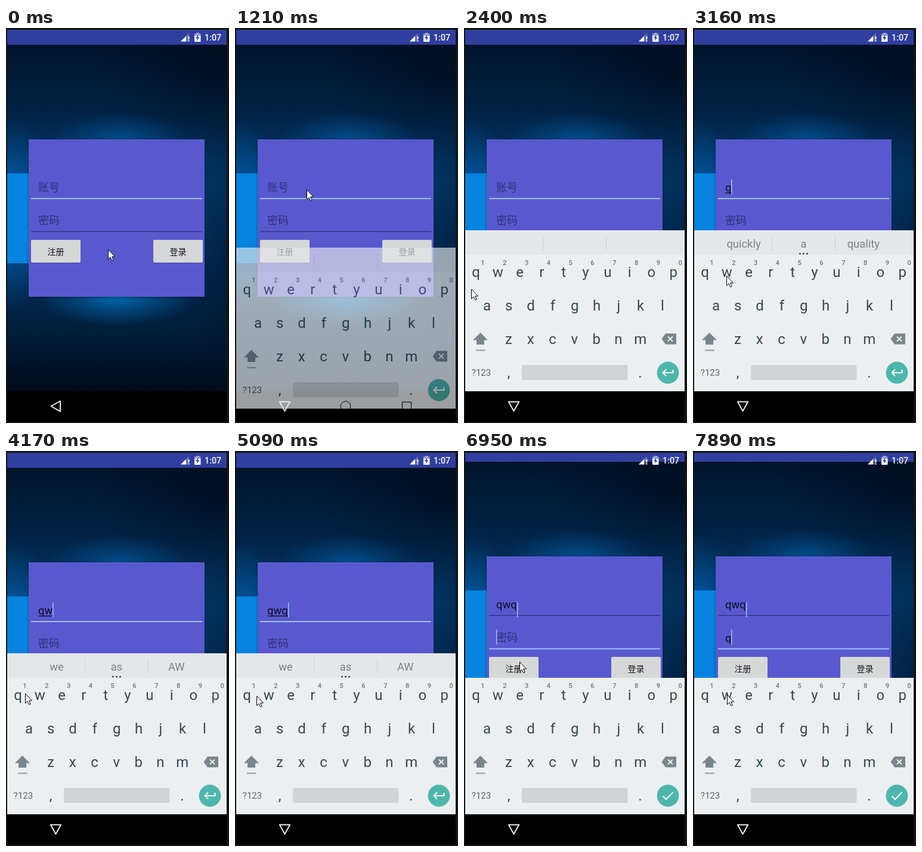
An HTML page with a canvas that plays this animation: 374 px wide and 660 px high, repeating every 8000 ms.

```html
<!DOCTYPE html>
<html lang="zh">
<head>
<meta charset="utf-8">
<style>
html, body { margin: 0; width: 100%; height: 100%; overflow: hidden; background: #141414; }
canvas { display: block; width: 374px; height: 660px; }
</style>
</head>
<body>
<canvas id="stage"></canvas>
<script>
const W = 374, H = 660, LOOP = 8000;
const LEFT = 2, SCREEN = 368, NAV_TOP = 607, KEYS_TOP = 379;
const dpr = window.devicePixelRatio || 1;

const LATIN = 'Roboto, sans-serif';
const CJK = '"Noto Sans CJK SC", "Noto Sans CJK", sans-serif';
const ACCENT = '#9cc0f6', HINT = '#303077', INK = '#0c0c20';
const KEY = '#37474f', KEY_ICON = '#78868c', KEY_BACK = '#eceff1';

const KEY_PRESSES = [2550, 3700, 4940];
const SUGGESTIONS = ['', 'quickly a quality', 'we as AW', 'sqq www away'];
const SUGGESTION_DELAY = 230;
const FIRST_FOCUS = 980, KEYBOARD_OPEN = 1130, SECOND_FOCUS = 6640, PASSWORD_KEY = 7700;

// Pointer waypoints: [ms, x, y]
const POINTER = [
  [200, 171, 370], [900, 108, 252], [1210, 120, 270], [1610, 133, 290], [2400, 12, 436],
  [2930, 56, 414], [3620, 56, 414], [4790, 6, 394], [5090, 35, 409], [5720, 360, 614],
  [6260, 187, 349], [6600, 140, 313], [7590, 8, 422], [7890, 57, 407]
];

function setUp(canvas) {
  canvas.width = W * dpr;
  canvas.height = H * dpr;
  const context = canvas.getContext('2d');
  context.scale(dpr, dpr);
  return context;
}

const stage = setUp(document.getElementById('stage'));
const layer = setUp(document.createElement('canvas'));
let ctx = stage;

const progress = (t, start, duration) => Math.min(1, Math.max(0, (t - start) / duration));
const pressed = t => KEY_PRESSES.filter(time => time <= t).length;

function rect(x, y, w, h, color, radius = 0) {
  ctx.fillStyle = color;
  ctx.beginPath();
  ctx.roundRect(x, y, w, h, radius);
  ctx.fill();
}

function text(str, x, y, size, color, { align = 'left', family = LATIN, weight = 400 } = {}) {
  ctx.font = `${weight} ${size}px ${family}`;
  ctx.textAlign = align;
  ctx.fillStyle = color;
  ctx.fillText(str, x, y);
}

function path(points, closed) {
  ctx.beginPath();
  points.forEach(([x, y]) => ctx.lineTo(x, y));
  if (closed) ctx.closePath();
}

function polygon(points, color) {
  path(points, true);
  ctx.fillStyle = color;
  ctx.fill();
}

function line(points, color, width, closed = false) {
  path(points, closed);
  ctx.strokeStyle = color;
  ctx.lineWidth = width;
  ctx.stroke();
}

function circle(x, y, r, color) {
  ctx.beginPath();
  ctx.arc(x, y, r, 0, Math.PI * 2);
  ctx.fillStyle = color;
  ctx.fill();
}

function glow(x, y, rx, ry, rgb, alpha) {
  ctx.save();
  ctx.translate(x, y);
  ctx.scale(rx, ry);
  const g = ctx.createRadialGradient(0, 0, 0, 0, 0, 1);
  g.addColorStop(0, `rgba(${rgb},${alpha})`);
  g.addColorStop(.5, `rgba(${rgb},${alpha * .45})`);
  g.addColorStop(1, `rgba(${rgb},0)`);
  ctx.fillStyle = g;
  ctx.fillRect(-1, -1, 2, 2);
  ctx.restore();
}

function wallpaper() {
  const g = ctx.createLinearGradient(0, 28, 0, 608);
  ['#00142b', '#012346', '#023a6c', '#023361', '#01203f', '#000b1a']
    .forEach((color, i, all) => g.addColorStop(i / (all.length - 1), color));
  rect(LEFT, 28, SCREEN, 580, g);
  glow(375, 70, 230, 150, '0,8,22', .6);
  glow(385, 400, 110, 260, '0,16,40', .6);
  glow(190, 186, 120, 45, '0,110,195', .5);
  glow(185, 450, 130, 48, '0,125,210', .75);
  glow(0, 310, 100, 160, '0,120,220', .75);
  rect(LEFT, 243, 150, 150, '#0784e0');
}

function button(x, label) {
  rect(x, 355, 83, 38, 'rgba(0,0,0,.25)', 2);
  rect(x, 354, 83, 38, '#d6d7d7', 2);
  text(label, x + 41.5, 379, 14, '#15151c', { align: 'center', family: CJK });
}

function field(value, hint, baseline, active, caret) {
  if (value) text(value, 54, baseline, 18.4, INK);
  else text(hint, 54, baseline - .5, 18, HINT, { family: CJK });
  rect(42, baseline + 11, 287, active ? 2 : 1.3, active ? ACCENT : HINT);
  if (!caret) return;
  ctx.font = `18.4px ${LATIN}`;
  rect(54 + Math.round(ctx.measureText(value).width), baseline - 20, 1.5, 25, ACCENT);
}

function loginCard(t) {
  const user = 'qwq'.slice(0, pressed(t));
  const second = t >= SECOND_FOCUS;
  ctx.save();
  ctx.shadowColor = 'rgba(0,0,0,.4)';
  ctx.shadowBlur = 4 * dpr;
  ctx.shadowOffsetY = dpr;
  rect(38, 186, 295, 263, '#5959cf');
  ctx.restore();

  const blinkOn = user || (t >= FIRST_FOCUS && t % 1000 > 450);
  field(user, '账号', 273, !second, !second && blinkOn);
  if (user && !second) {
    ctx.font = `18.4px ${LATIN}`;
    rect(54, 275, ctx.measureText(user).width, 1.3, INK);
  }
  field(t >= PASSWORD_KEY ? 'q' : '', '密码', 328.5, second, second);
  button(42, '注册');
  button(247, '登录');
}

function suggestions(t) {
  rect(LEFT, 338, SCREEN, 41, '#e4e7e9');
  [132, 238].forEach(x => rect(x, 348, 1, 24, '#cbd0d2'));
  const words = SUGGESTIONS[pressed(t - SUGGESTION_DELAY)];
  if (!words) return;
  words.split(' ').forEach((word, i) =>
    text(word, 85 + i * 100.4, 367, 18.4, '#788287', { align: 'center' }));
  [-6, 0, 6].forEach(dx => circle(185.5 + dx, 377, 1.5, KEY));
}

function shiftIcon(x, y) {
  polygon([[x, y], [x + 12.5, y + 12.5], [x - 12.5, y + 12.5]], KEY_ICON);
  rect(x - 6.5, y + 12, 13, 8, KEY_ICON);
  rect(x - 7.5, y + 28.5, 15.5, 2, '#929da2');
}

function deleteIcon(x, y) {
  polygon([[x - 14.5, y], [x - 8, y - 9], [x + 10, y - 9], [x + 10, y + 9], [x - 8, y + 9]], KEY_ICON);
  [-4, 4].forEach(d => line([[x - 4, y - d], [x + 4, y + d]], KEY_BACK, 2));
}

function enterIcon(x, y, done) {
  circle(x, y, 18.4, '#4db6ac');
  if (done) return line([[x - 8.5, y + .5], [x - 3, y + 6], [x + 8.5, y - 6]], '#fff', 2);
  line([[x + 8.5, y - 5], [x + 8.5, y], [x - 8, y]], '#fff', 2);
  line([[x - 3, y - 5.5], [x - 8.5, y], [x - 3, y + 5.5]], '#fff', 2);
}

function keys(t) {
  const center = { align: 'center' };
  const passwordMode = t >= SECOND_FOCUS + 80;
  if (!passwordMode) suggestions(t);
  rect(LEFT, KEYS_TOP, SCREEN, NAV_TOP - KEYS_TOP, KEY_BACK);
  [['qwertyuiop', 20], ['asdfghjkl', 38.5], ['zxcvbnm', 75]].forEach(([row, x], r) =>
    [...row].forEach((ch, i) => text(ch, x + i * 36.8, 416 + r * 56, 24, KEY, center)));
  [...'1234567890'].forEach((ch, i) =>
    text(ch, 31.5 + i * 36.8, 396, 11, '#69757b', { align: 'center', weight: 500 }));
  text('?123', 29, 581, 15, '#56646b', center);
  text(',', 75, 584, 24, KEY, center);
  text('.', 295.5, 584, 24, KEY, center);
  rect(97, 563, 177.5, 25, '#d0d4d6', 3);
  shiftIcon(27.5, 509);
  deleteIcon(346, 519.5);
  enterIcon(342, 576, passwordMode);
}

// Drawn on its own layer so the whole panel fades as one
function keyboard(t) {
  if (t < KEYBOARD_OPEN) return;
  const rest = (1 - progress(t, KEYBOARD_OPEN, 240)) ** 2;
  ctx = layer;
  ctx.clearRect(0, 0, W, H);
  keys(t);
  ctx = stage;
  ctx.globalAlpha = 1 - .77 * rest;
  ctx.drawImage(layer.canvas, 0, Math.round(65 * rest), W, H);
  ctx.globalAlpha = 1;
}

function statusIcons() {
  polygon([[293, 22.5], [307, 22.5], [307, 8.5]], 'rgba(255,255,255,.25)');
  polygon([[293, 22.5], [302, 22.5], [302, 13.5]], '#fff');
  rect(305.5, 14, 2, 5, '#fff');
  rect(305.5, 20.5, 2, 2, '#fff');
  rect(319, 8, 5, 2, '#9ba3d2');
  rect(316, 9.5, 10.5, 5, '#9ba3d2');
  rect(316, 13, 10.5, 10, '#fff', 1);
  polygon([[322.5, 11], [318, 17], [320.8, 17], [320, 21.5], [324.5, 15.5], [321.8, 15.5]], '#303f9f');
  text('1:07', 333, 21, 14.3, '#fff', { weight: 500 });
}

function navIcons(t) {
  const color = '#e8eaeb';
  ctx.save();
  ctx.lineJoin = 'round';
  ctx.translate(83.5, 632);
  if (t >= FIRST_FOCUS) ctx.rotate(-Math.PI / 2);
  line([[-8, 0], [7.5, -8.7], [7.5, 8.7]], color, 2, true);
  ctx.restore();
  ctx.beginPath();
  ctx.arc(185.5, 632, 8.3, 0, Math.PI * 2);
  ctx.stroke();
  ctx.strokeRect(280.5, 625, 15, 14.5);
}

function pointer(t) {
  const next = POINTER.findIndex(p => p[0] > t);
  const b = POINTER.at(next), a = next > 0 ? POINTER[next - 1] : b;
  const f = a === b ? 0 : progress(t, a[0], b[0] - a[0]);
  const mix = n => Math.round(a[n] + (b[n] - a[n]) * f) + .5;
  ctx.save();
  ctx.translate(mix(1), mix(2));
  const arrow = [[0, 0], [0, 16], [3.6, 12.6], [6.2, 18.2], [8.6, 17.2], [6.2, 11.5], [11, 11.5]];
  polygon(arrow, '#fff');
  line(arrow, '#000', 1, true);
  ctx.restore();
}

function draw(t) {
  rect(0, 0, W, H, '#141414');
  ctx.save();
  ctx.beginPath();
  ctx.rect(LEFT, 3, SCREEN, 655);
  ctx.clip();

  const pan = Math.round(10 * progress(t, SECOND_FOCUS, 240));
  ctx.save();
  ctx.translate(0, -pan);
  wallpaper();
  loginCard(t);
  ctx.restore();
  if (pan) rect(89, 253, 1.5, 25, ACCENT);
  rect(LEFT, 3, SCREEN, 25 - pan, '#303f9f');
  statusIcons();
  rect(LEFT, NAV_TOP, SCREEN, 51, '#000');
  keyboard(t);
  navIcons(t);
  ctx.restore();
  pointer(t);
}

function tick(now) {
  draw(now % LOOP);
  requestAnimationFrame(tick);
}
requestAnimationFrame(tick);
</script>
</body>
</html>
```
